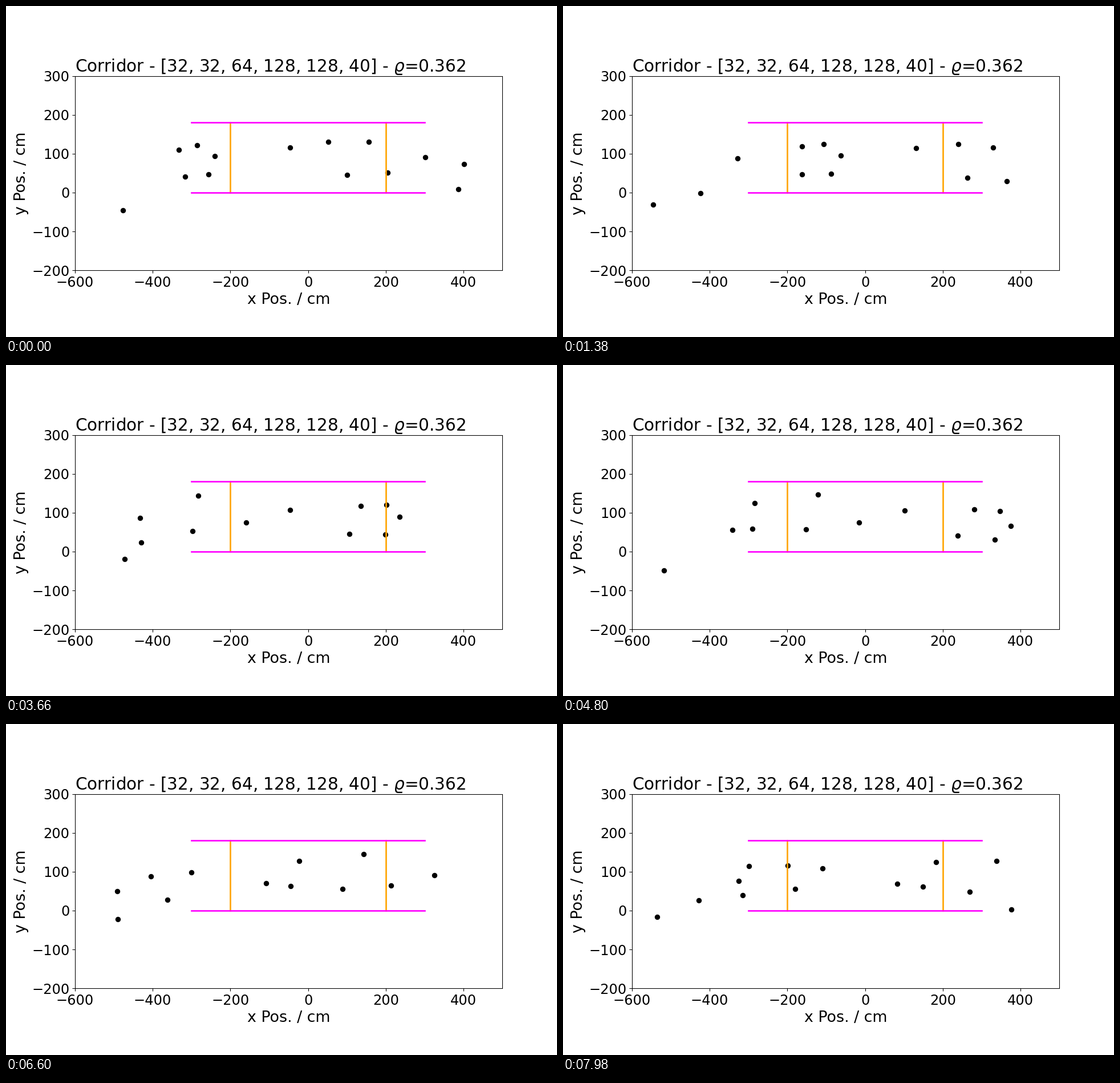
Recreate the animation shown at these times as a matplotlib script. Size 966 px wide and 580 px high, loop 8 s.

```python
import numpy as np
import matplotlib.pyplot as plt
from matplotlib.animation import FuncAnimation

W, H = 966, 580
PT = 96.6 / 72                     # pixels per point; the figure itself uses 72 dpi
LEFT, WIDTH = 120.9, 749.4         # plot box on the stage
CM = WIDTH / 1100                  # pixels per centimetre
X0, Y0 = LEFT + 600 * CM, 327.0    # stage position of the data origin
STEP_MS, FRAME_MS, LOOP_MS = 60, 40, 8000

plt.rcParams.update({
    "font.family": "DejaVu Sans",
    "font.size": 18 * PT,
    "axes.linewidth": 0.8 * PT,
    "axes.labelsize": 20 * PT,
    "axes.labelpad": 4 * PT,
    "axes.titlesize": 22 * PT,
    "axes.titlepad": 6 * PT,
})
for side in "xy":
    plt.rcParams.update({
        f"{side}tick.labelsize": 18 * PT,
        f"{side}tick.major.size": 3.5 * PT,
        f"{side}tick.major.width": 0.8 * PT,
        f"{side}tick.major.pad": 3.5 * PT,
    })


class Walker:
    """Climbs into a lane, crosses the corridor and bends off at its end.

    mid: step at the middle, speed: pixels per step there, lane: height on
    the stage. Everyone is a little slower towards both ends.
    """

    def __init__(self, mid, speed, lane, climb=70, bend=12, out=789):
        self.mid, self.speed, self.lane = mid, speed, lane
        self.climb, self.bend, self.out = climb, bend, out

    def at(self, step):
        x = 540 + 700 * np.tanh(self.speed * (step - self.mid) / 700)
        y = (self.lane
             + self.climb * (1 - np.tanh((x - 220) / 70)) / 2
             + self.bend * np.exp((x - 755) / 60))
        return x, y

    def seen(self, step):
        x, y = self.at(step)
        return 152 < x < self.out and y < 363


walkers = [
    Walker(-53, 5.0, 298, out=808),
    Walker(-51.2, 5.4, 250, out=808),
    Walker(-37.1, 5.4, 256),
    Walker(-25.6, 5.1, 289),
    Walker(-17.9, 5.41, 236),
    Walker(-11.7, 4.97, 295),
    Walker(-4.4, 5.67, 238),
    Walker(8.0, 5.28, 248),
    Walker(32.8, 5.42, 262),
    Walker(36.6, 5.18, 294),
    Walker(37.9, 5.57, 242),
    Walker(45.7, 5.4, 246),
    Walker(48.2, 4.86, 295),
    Walker(68.9, 5.29, 254, climb=172),
    Walker(84.0, 5.24, 275, climb=150, bend=30),
    Walker(95.5, 6.06, 227),
    Walker(100.9, 5.5, 288),
    Walker(114.3, 6.14, 240),
    Walker(117.1, 5.78, 284),
    Walker(124.9, 5.64, 279, climb=105),
    Walker(147.2, 5.98, 253, climb=139),
    Walker(154.9, 6.76, 248),
    Walker(155.9, 5.87, 288, climb=140),
    Walker(165.4, 6.82, 246),
    Walker(168.5, 6.8, 264, climb=140),
    Walker(170.4, 6.23, 296),
    Walker(190.7, 5.6, 257, climb=140),
    Walker(207.8, 5.6, 280),
]


def positions(step):
    x, y = np.array([w.at(step) for w in walkers if w.seen(step)]).T
    return np.column_stack([(x - X0) / CM, (Y0 - y) / CM])


fig = plt.figure(figsize=(W / 72, H / 72), dpi=72, facecolor="white")
ax = fig.add_axes([LEFT / W, 0.11, WIDTH / W, 0.77])
ax.set_aspect("equal")
ax.set_xlim(-600, 500)
ax.set_ylim(-200, 300)
ax.set_xticks(range(-600, 500, 200))
ax.set_yticks(range(-200, 301, 100))
ax.set_xlabel("x Pos. / cm")
ax.set_ylabel("y Pos. / cm")
ax.set_title(r"Corridor - [32, 32, 64, 128, 128, 40] - $\varrho$=0.362", loc="left")

for x in (-200, 200):
    ax.plot([x, x], [0, 180], color="orange", lw=2 * PT)
for y in (0, 180):
    ax.plot([-300, 300], [y, y], color="magenta", lw=2 * PT)
dots = ax.scatter([], [], s=36 * PT ** 2, c="black", linewidths=PT, zorder=1)


def update(frame):
    step = (frame * FRAME_MS + FRAME_MS // 2) // STEP_MS
    dots.set_offsets(positions(step))
    return [dots]


anim = FuncAnimation(fig, update, frames=LOOP_MS // FRAME_MS,
                     interval=FRAME_MS, repeat=True, repeat_delay=0)
plt.show()
```
